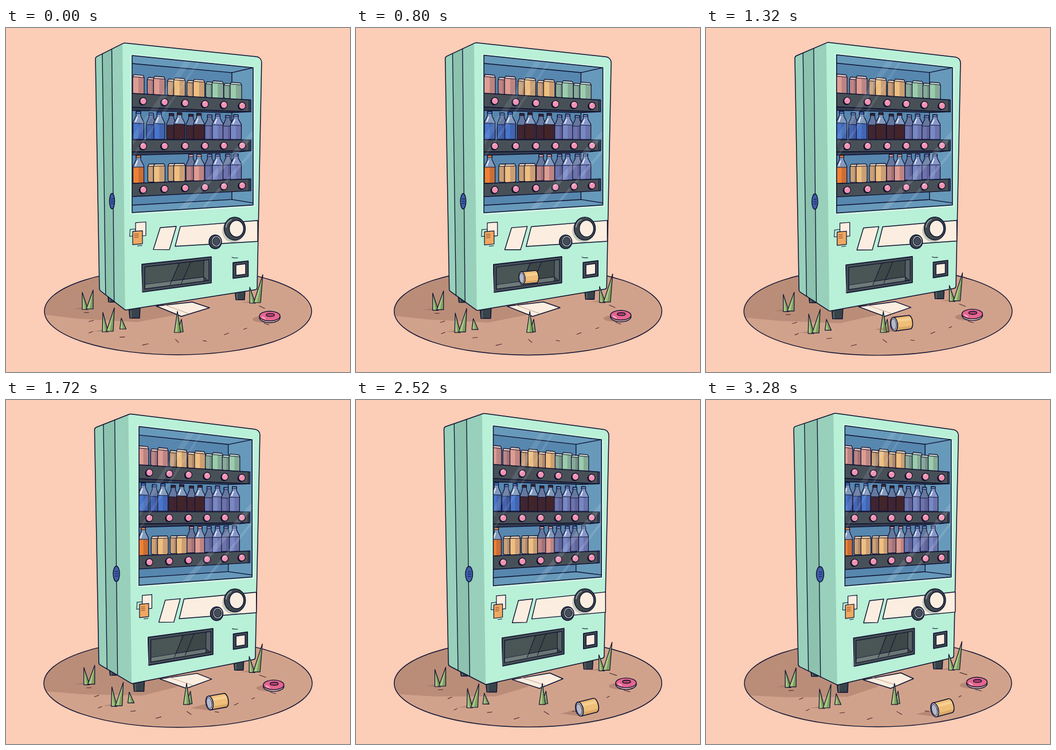
Write an HTML page with a canvas that moves like this. It is 600 px wide and 600 px high and loops after 3.32 s.

```html
<!DOCTYPE html>
<html lang="en">
<head>
<meta charset="utf-8">
<title>Vending machine</title>
<style>
html, body { margin: 0; width: 100%; height: 100%; overflow: hidden; background: #fccdb7; }
canvas { display: block; width: 600px; height: 600px; }
</style>
</head>
<body>
<canvas id="stage"></canvas>
<script>
const LOOP = 3320, STEP = 40, INK = '#0e1130', SOIL = '#4a3038', SHADE = 'rgba(140,95,84,.4)';
const CREAM = '#fbeee0', ORANGE = '#efbf80', PINK = '#dd9d92', GREEN = '#9bcdac';
const BLUE = '#4776cb', BROWN = '#432528', LILAC = '#7888c4', AMBER = '#ee8133';
const HUB = { x: 300, y: 494, rx: 233, ry: 76 };
const canvas = document.getElementById('stage');
const c = canvas.getContext('2d');
const dpr = window.devicePixelRatio || 1;
canvas.width = canvas.height = 600 * dpr;
let u = 0; // how far the scene has turned, 0 to 1

const mix = (a, b) => a + (b - a) * u;
const turn = (x0, y0, x1, y1) => [mix(x0, x1), mix(y0, y1)];
const clamp = v => Math.max(0, Math.min(1, v));
const six = draw => { for (let i = 0; i < 6; i++) draw(i); };

function random(seed) {
  return () => (seed = seed * 16807 % 2147483647) / 2147483647;
}

// Point on the ground, carried round the hub
function spin(x, y) {
  const dx = (x - HUB.x) / HUB.rx, dy = (y - HUB.y) / HUB.ry;
  return [x + u * (.2 * HUB.rx * dy + 7), y - u * .2 * HUB.ry * dx];
}

// Point on the machine's front as it turns; depth adds parallax
function swing(x, y, depth = 0) {
  const w = (440 - x) / 230;
  const dy = w * (y - 210) * .021 - (1 - w) * Math.max(0, y - 310) * .04;
  return [x + u * (20 - .1214 * (x - 239) - depth), y + u * dy];
}

// Same, with y measured at the front's left edge and lines converging to the right
function face(x, y, depth) {
  const d = 196 - y;
  return swing(x, y + (x - 220) * d * (d > 0 ? .00068 : .0005), depth);
}
const onFace = (pts, depth) => pts.map(p => face(p[0], p[1], depth));
const box = (l, t, r, b, depth) => onFace([[l, t], [r, t], [r, b], [l, b]], depth);

function paint(fill, stroke = INK, width = 1.4) {
  if (fill) { c.fillStyle = fill; c.fill(); }
  if (stroke) { c.strokeStyle = stroke; c.lineWidth = width; c.stroke(); }
}
function trace(pts, closed = true) {
  c.beginPath();
  pts.forEach(p => c.lineTo(p[0], p[1]));
  if (closed) c.closePath();
}
function poly(pts, fill, stroke, width) { trace(pts); paint(fill, stroke, width); }
function line(pts, stroke = INK, width = 1.3) { trace(pts, false); paint(null, stroke, width); }
function oval(x, y, rx, ry, fill, stroke, width) {
  c.beginPath();
  c.ellipse(x, y, rx, ry, 0, 0, Math.PI * 2);
  paint(fill, stroke, width);
}

// Fills an outline, draws inside it, then inks the edge
function filled(outline, fill, inside, width) {
  outline();
  paint(fill, null);
  c.save();
  c.clip();
  inside();
  c.restore();
  outline();
  paint(null, INK, width);
}

function traceRound(pts, radii) {
  const n = pts.length, a = pts[0], z = pts[n - 1];
  c.beginPath();
  c.moveTo((a[0] + z[0]) / 2, (a[1] + z[1]) / 2);
  pts.forEach((p, i) => c.arcTo(p[0], p[1], ...pts[(i + 1) % n], radii[i]));
  c.closePath();
}

/* ---------- ground ---------- */

function ground() {
  const swell = Math.sin(Math.PI * u);
  const disc = () => {
    c.beginPath();
    c.ellipse(HUB.x, HUB.y, HUB.rx + swell, HUB.ry + swell, 0, 0, Math.PI * 2);
  };
  filled(disc, '#d1a28b', () => {
    poly([[50, 400], spin(50, 498), spin(125, 507), spin(228, 513), [300, 500], [300, 400]], '#ba8d79', null);
  });

  const rnd = random(29);
  for (let i = 0; i < 12; i++) {
    const a = -.2 + i * .3, r = .62 + .22 * rnd(), tilt = rnd() * 9 - 3;
    const x = HUB.x + HUB.rx * r * Math.cos(a), y = HUB.y + HUB.ry * r * Math.sin(a);
    line([spin(x, y), spin(x + 5 + 5 * rnd(), y + tilt)], SOIL, 1.1);
  }

  const left = turn(262, 485, 274, 488), right = turn(355, 488, 362, 486);
  poly([left, turn(306, 503, 322, 503), right, turn(325, 478, 340, 476)], CREAM);
  line([turn(277, 483, 290, 484), turn(318, 498, 334, 498)], '#baa593', 1);
}

// Blade from a base of half width w, leaning to its tip
function blade(x, y, w, lean, h) {
  const tip = [x + lean, y - h];
  poly([tip, [x + w, y], [x - w, y]], '#7f9f5f', null);
  poly([tip, [x, y], [x - w, y]], '#aac585', null);
  poly([tip, [x + w, y], [x - w, y]], null, INK, 1.2);
}
function tuft(rootX, rootY, h1, h2, lean1, lean2) {
  const [x, y] = spin(rootX, rootY);
  poly([[x - 25, y - 1], [x, y - 5], [x, y]], SHADE, null);
  blade(x - 4, y, 5, lean1, h1);
  blade(x + 4, y - 1, 6, lean2, h2);
}
function plants() {
  tuft(142, 491, 30, 33, -5, 6);
  tuft(177, 530, 34, 41, -4, 8);
  tuft(434, 480, 28, 49, -5, 10);
  blade(...spin(204, 525), 5.5, -3, 19);
  blade(...spin(304, 530), 5, 2, 22);
  blade(...spin(299, 531), 5.5, 0, 37);
}

function donut() {
  const [x, y] = spin(460, 503);
  oval(x - 8, y + 5, 22, 6, SHADE, null);
  oval(x, y + 2, 18, 9, '#f5cfc6');
  oval(x, y - .5, 18, 8.5, '#e4668e');
  oval(x + 1, y - 2.5, 7, 2.6, '#b94469');
  line([[x - 13, y + 1], [x - 8, y + 4]], '#f9b5c8', 2);
}

/* ---------- machine ---------- */

function foot(x, y, w, h) {
  poly([[x - w, y - 8], [x + w, y - 8], [x + w - 1, y + h], [x - w + 2, y + h]], '#39434a');
  line([[x - w + 4, y], [x - w + 4, y + h - 1]], '#59656a', 2);
}

function body() {
  foot(...turn(184, 471, 189, 475), 7, 7);
  foot(...turn(224, 494, 238, 498), 10, 12);
  foot(...turn(408, 463, 404, 458), 9, 11);

  const backTop = turn(156, 51, 153, 47), apex = turn(206, 26, 225, 23);
  const backFoot = turn(163, 457, 161, 464), corner = turn(208, 492, 229, 497);
  const shell = [backTop, apex, turn(446, 51, 440.5, 53), turn(438, 456, 432, 449), corner, backFoot];
  const along = (a, b, k) => [a[0] + (b[0] - a[0]) * k, a[1] + (b[1] - a[1]) * k];
  const seams = [mix(.24, .26), mix(.57, .57)].map(k => [along(backTop, apex, k), along(backFoot, corner, k)]);
  filled(() => traceRound(shell, [5, 7, 10, 4, 4, 5]), '#98d0bb', () => {
    poly([...seams[0], seams[1][1], seams[1][0]], '#8cc2ae', null);
    poly([[apex[0] - 3, 10], [460, 10], [460, 510], [corner[0], 510]], '#b9f0d8', null);
  }, 1.5);
  seams.forEach(s => line(s));

  const [x, y] = turn(185, 302, 199, 304);
  oval(x, y, mix(4.5, 6.5), 13.5, '#3f5da8');
  for (let d = -4; d <= 4; d += 4) line([[x - 2, y + d], [x + 3, y + d]], INK, .9);
}

// Darkens the right side of a drink, and all of one at the back
function dim(x, w, top, base, depth, back) {
  poly(box(x, top, x + w, base, depth), 'rgba(55,30,65,.2)', null);
  if (back) poly(box(x - w, top, x + w, base, depth), 'rgba(55,35,75,.2)', null);
}

function tin(x, top, base, color, back) {
  const w = back ? 8 : 10, d = back ? 8 : 5;
  const shape = onFace([[x - w + 2, top], [x + w - 2, top], [x + w, top + 4], [x + w, base - 2],
    [x + w - 2, base], [x - w + 2, base], [x - w, base - 2], [x - w, top + 4]], d);
  poly(shape, color, null);
  dim(x, w, top + 4, base - 1, d, back);
  line(onFace([[x - w + 2, top + 2], [x + w - 2, top + 2]], d), '#dcd6d2', 1.5);
  line(onFace([[x - w, top + 4], [x + w, top + 4]], d), INK, .9);
  poly(shape, null, INK, 1.2);
}

function bottle(x, top, base, color, back) {
  const w = back ? 8.5 : 9.5, d = back ? 8 : 5, neck = top + 8, fill = top + 21;
  const shape = onFace([[x - 4, top], [x + 4, top], [x + 4, neck], [x + w, fill - 2], [x + w, base],
    [x - w, base], [x - w, fill - 2], [x - 4, neck]], d);
  poly(shape, back ? '#66789f' : color === LILAC ? '#8796ca' : '#8299bd', null);
  poly(box(x - w, fill, x + w, base, d), color, null);
  dim(x, w, fill, base, d, back);
  if (!back) line(onFace([[x - 2, neck + 2], [x - 5, fill - 3]], d), '#e6edf5', 2);
  poly(box(x - 4, top, x + 4, top + 4, d), color, INK, .9);
  poly(shape, null, INK, 1.2);
  line(onFace([[x - w, fill], [x + w, fill]], d), INK, .9);
}

// Centre of the i-th front drink; each has one behind it to the left
const slot = i => 231 + 37 * i - .6 * i * i;

function shelf(top, h, under) {
  const base = top + h;
  if (under) poly(onFace([[214, base], [427, base], [394, base + 3], [214, base + 6]]), '#333e50');
  poly(box(214, top, 427, base), '#485057');
  line(onFace([[424, top], [424, base]]), INK, 1);
  six(i => {
    const [x, y] = face(239.5 + 38 * i - .7 * i * i, top + h * .52);
    oval(x - 1.5, y + 1, 6.3, 6.5, INK, null);
    oval(x, y, 5.8, 6.1, '#f193b0', INK, 1.2);
    line([[x - 2.5, y - 2.5], [x, y - 3.5]], '#fbd0dc', 1.2);
  });
}

function stock() {
  const tins = [PINK, ORANGE, GREEN], drinks = [BLUE, BROWN, LILAC];
  six(i => {
    const color = tins[i >> 1];
    if (i) tin(slot(i) - 13, 84, 114, color, true);
    tin(slot(i), 81, 115, color);
  });
  shelf(114, 24, true);

  six(i => {
    const color = drinks[i >> 1];
    if (i) bottle(slot(i) - 14, 147, 194, color, true);
    bottle(slot(i), 145, 194, color);
  });
  shelf(195, 21, true);

  six(i => {
    const isTin = i === 1 || i === 2, make = isTin ? tin : bottle;
    const top = isTin ? 238 : 222, color = isTin ? ORANGE : i === 0 ? AMBER : i === 3 ? PINK : LILAC;
    if (i) make(slot(i) - (isTin ? 12 : 14), top, 270, color, true);
    make(slot(i), top, 271, color);
  });
  shelf(271, 23, false);
}

// Slanted band of light on the glass
function glint(x, y, width, run, rise, alpha) {
  poly([swing(x, y), swing(x + width, y), swing(x + width - run, y + rise), swing(x - run, y + rise)],
    `rgba(225,240,250,${alpha})`, null);
}

function cabinet() {
  const pane = box(220, 48, 431, 322);
  filled(() => trace(pane), '#6799ba', () => {
    poly(box(200, 62, 394, 309, 13), '#5787ae');
    line([face(394, 62, 13), face(431, 48)]);
    line([face(394, 309, 13), face(431, 318)]);
    stock();
    glint(312, 57, 12, 105, 150, .1);
    glint(335, 57, 5, 118, 170, .1);
    glint(431, 178, 12, 132, 140, .15);
    glint(431, 210, 6, 95, 110, .15);
  }, 1.5);
  line(onFace([[433.5, 49], [433.5, 324.5], [221, 324.5]]), '#eafaf4', 1.3);
  line(onFace([[217, 324], [217, 46], [431, 46]]), '#d9f8eb', 1);
}

function panel() {
  poly(onFace([[269, 352], [297, 352], [285, 393], [257, 390]]), CREAM);
  poly(onFace([[304, 353], [439, 353], [439, 394], [295, 388]]), CREAM);

  poly(box(216, 351, 226, 363), null, INK, 1);
  poly(box(226, 340, 244, 364), CREAM, INK, 1.2);
  poly(box(221, 355, 238, 378), '#f0a862', INK, 1.2);
  for (let y = 360; y < 368; y += 3) line(onFace([[224, y], [231, y]]), '#8a4c2f', 1);
  line(onFace([[229, 381], [237, 381]]), INK, 1);

  const [kx, ky] = swing(400, 350);
  oval(kx - 4, ky + 4, 19, 20, 'rgba(70,120,110,.3)', null);
  oval(kx - 1, ky, 18.5, 20, '#3f494d');
  oval(kx + 2, ky, 12.5, 14.5, CREAM);
  c.beginPath();
  c.ellipse(kx - 1, ky, 15.5, 17, 0, 3.3, 4.3);
  paint(null, '#8b9696', 2);

  const [sx, sy] = swing(366, 372);
  oval(sx - 1, sy + 1, 11, 12, '#39434a');
  oval(sx + 1, sy, 8.5, 9.5, '#c5cdc9', INK, 1);
  oval(sx + 1, sy, 6.3, 7.2, '#444d58', INK, 1);

  line([swing(394, 400), swing(398, 401), swing(404, 401)], INK, 1.1);
  poly(box(396, 430, 422.5, 460), '#414a52', INK, 1.6);
  poly(box(401, 435, 418, 455), CREAM);
}

/* ---------- dispensed can ---------- */

function can(x, y, angle, size) {
  const half = 12.5;
  c.save();
  c.translate(x, y);
  c.rotate(angle);
  c.scale(size, size);
  const side = () => {
    c.beginPath();
    c.moveTo(-13, -half);
    c.ellipse(15, 0, 5.5, half, 0, -Math.PI / 2, Math.PI / 2);
    c.lineTo(-13, half);
    c.closePath();
  };
  filled(side, '#efbe78', () => {
    c.fillStyle = '#f5d091';
    c.fillRect(-20, -8, 50, 5);
    c.fillStyle = '#dba866';
    c.fillRect(-20, 7, 50, 6);
  }, 1.6);
  oval(-13.5, 0, 6.5, half, '#e6e3e4', INK, 1.6);
  oval(-14, 0, 4.8, 10, '#b4b8c8', INK, .9);
  c.restore();
}

function tray(t) {
  poly(box(237, 414, 358, 463), '#454f55', INK, 1.6);
  const hole = box(242, 419, 354, 458);
  filled(() => trace(hole), '#3d4748', () => {
    poly(box(242, 450, 345, 462), '#6b7674', INK, 1);
    poly(onFace([[345, 410], [356, 410], [356, 462], [345, 450]]), '#566162', INK, 1);
    poly(onFace([[242, 410], [304, 410], [284, 462], [242, 462]]), 'rgba(120,145,135,.2)', null);
    for (let x = 304; x < 330; x += 20) line(onFace([[x, 416], [x - 18, 456]]), INK, 1);
    if (t >= 520 && t < 960) {
      const fall = clamp((t - 520) / 180), hop = clamp((t - 700) / 80);
      can(301, 398 + 37 * fall * fall - 4 * Math.sin(Math.PI * hop), -.09 - .3 * (1 - fall), .86);
    }
  }, 1.2);
  line(onFace([[235, 414], [237, 464]]), '#e0faf0', 1.2);
}

function looseCan(t) {
  if (t < 960) return;
  if (t < 1160) {
    const p = (t - 960) / 200;
    can(302 + 26 * p, 435 + 74 * p * p, -.09, .86 + .1 * p);
    return;
  }
  // Rolls on, slowing evenly to rest
  const left = .0045 * Math.max(0, 3195 - t), q = left * left / 71;
  const x = 412 - left * left, y = 537 - 22 * q ** 1.5;
  poly([[x - 46, y + 11], [x - 16, y + 3], [x + 8, y + 12], [x - 14, y + 15]], SHADE, null);
  can(x, y, -.26 + .13 * q, 1 - .04 * q);
}

function draw() {
  const now = (performance.now() - start) % LOOP;
  const t = Math.floor(now / STEP) * STEP;
  u = (1 - Math.cos(Math.PI * t / (LOOP - STEP))) / 2;
  c.setTransform(dpr, 0, 0, dpr, 0, 0);
  c.lineJoin = c.lineCap = 'round';
  c.fillStyle = '#fccdb7';
  c.fillRect(0, 0, 600, 600);
  ground();
  body();
  cabinet();
  panel();
  tray(t);
  plants();
  donut();
  looseCan(t);
  requestAnimationFrame(draw);
}
const start = performance.now();
draw();
</script>
</body>
</html>
```
